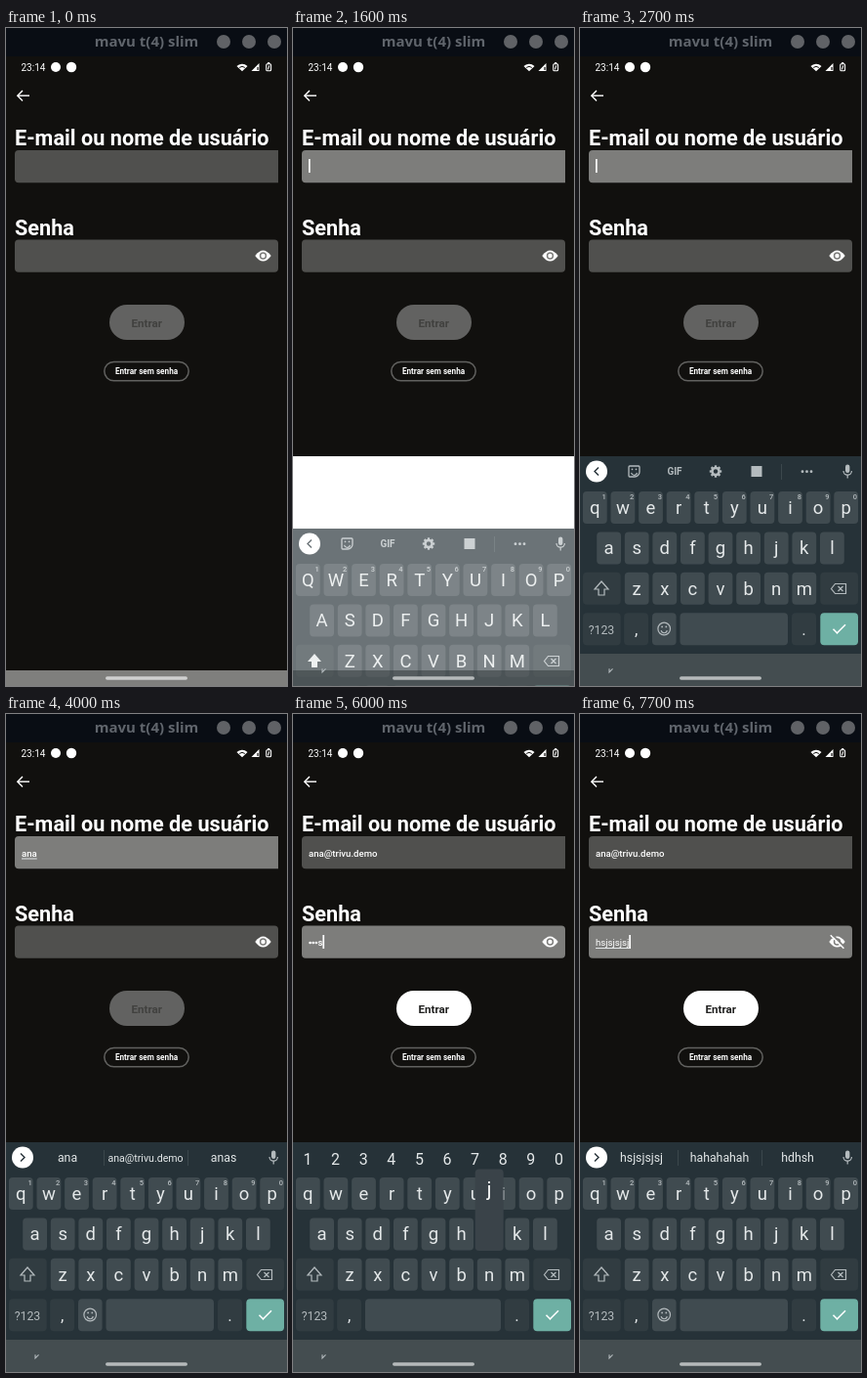
Animation, 288 px wide and 673 px high, one loop 8000 ms. Source, as an HTML page with a canvas:

```html
<!DOCTYPE html>
<html lang="pt">
<head>
<meta charset="utf-8">
<title>Login</title>
<style>
html, body { margin: 0; width: 100%; height: 100%; overflow: hidden; background: #11100e; }
canvas { display: block; width: 288px; height: 673px; }
</style>
</head>
<body>
<canvas id="stage"></canvas>
<script>
const W = 288, H = 673, LOOP = 8000, STEP = 100, BLINK = 500;
const EMAIL = 'ana@trivu.demo', PASS = 'hsjsjsjsj';
const PITCH = 28.6, ROW_H = 33, ROW_GAP = 41.4, KB_TOP = 438, KEY_TOP = 474;
const LETTERS = ['qwertyuiop', 'asdfghjkl', 'zxcvbnm'];
const C = {
  page: '#11100e', idle: '#50504e', focus: '#7d7d7b', rim: '#61615f',
  board: '#263238', key: '#404b50', fn: '#313c41', popup: '#3a4349', rule: '#3b474c',
  icon: '#b4bbbe', ink: '#e4e8e9', white: '#fff'
};

// Key moments in ms
const OPEN = 1400, LOWER = 2200, ACCEPT = 4200, NEXT = 5100, REVEAL = 7300;

const canvas = document.getElementById('stage');
const dpr = window.devicePixelRatio || 1;
canvas.width = W * dpr;
canvas.height = H * dpr;
const g = canvas.getContext('2d');

function rect(x, y, w, h, color) {
  g.fillStyle = color;
  g.fillRect(x, y, w, h);
}
function fill(color) {
  g.fillStyle = color;
  g.fill();
}
function stroke(color, width = 1.2) {
  g.strokeStyle = color;
  g.lineWidth = width;
  g.stroke();
}
function roundPath(x, y, w, h, r) {
  g.beginPath();
  g.roundRect(x, y, w, h, r);
}
function box(x, y, w, h, r, color) {
  roundPath(x, y, w, h, r);
  fill(color);
}
function frame(x, y, w, h, r, color, width) {
  roundPath(x, y, w, h, r);
  stroke(color, width);
}
function arc(x, y, r, from, to, color, width) {
  g.beginPath();
  g.arc(x, y, r, from, to);
  stroke(color, width);
}
function dot(x, y, r, color) {
  g.beginPath();
  g.arc(x, y, r, 0, 7);
  fill(color);
}
function line(x1, y1, x2, y2, color, width) {
  g.beginPath();
  g.moveTo(x1, y1);
  g.lineTo(x2, y2);
  stroke(color, width);
}
// An open "v" with its tip at (x, y), arms reaching back along dx or dy.
function chevron(x, y, dx, dy, color, width) {
  g.beginPath();
  g.moveTo(x + dx, y + (dy || dx));
  g.lineTo(x, y);
  g.lineTo(x + (dx || -dy), y + (dy || -dx));
  stroke(color, width);
}
function text(s, x, y, size, color, weight = 400, align = 'left', family = 'Roboto') {
  g.font = `${weight} ${size}px ${family}, sans-serif`;
  g.textAlign = align;
  g.fillStyle = color;
  g.fillText(s, x, y);
  return g.measureText(s).width;
}
const label = (s, x, y, size, color = C.ink, weight = 400) => text(s, x, y, size, color, weight, 'center');

// A burst presses its keys one after another; a letter lands on release.
const mailBursts = [
  { keys: 'a', from: 2800, gap: 100, hold: 100 },
  { keys: 'na', from: 3300, gap: 100, hold: 100 }
];
const passBursts = [{ keys: PASS, from: 5500, gap: 105, hold: 130 }];

function typing(bursts, t, focus) {
  const out = { text: '', popup: '', last: focus };
  for (const { keys, from, gap, hold } of bursts) {
    [...keys].forEach((k, i) => {
      const down = from + i * gap, up = down + hold;
      if (t >= up) {
        out.text += k;
        out.last = up;
      } else if (t >= down) out.popup = k;
    });
  }
  return out;
}

function stateAt(t) {
  const mail = typing(mailBursts, t, OPEN), pass = typing(passBursts, t, NEXT);
  const accepted = t >= ACCEPT, secret = t >= NEXT, shown = t >= REVEAL;
  if (accepted) [mail.text, mail.last] = [EMAIL, ACCEPT];
  if (shown) pass.last = REVEAL;
  const settle = REVEAL + 2 * STEP;
  const last = secret ? pass.last : mail.last;
  const k = Math.min(1, Math.max(0, (t - OPEN - 25) / 400));
  const busy = t < settle && secret || !mail.text;
  return {
    mail, pass, accepted, secret, shown,
    composing: t >= settle,
    tapEye: !shown && t >= REVEAL - STEP,
    tapWord: accepted && t < ACCEPT + STEP,
    caret: t >= OPEN && Math.floor((t - last) / BLINK) % 2 === 0,
    mailFocus: t >= OPEN && t < NEXT + STEP,
    passFocus: t >= NEXT + STEP,
    keyboard: t > OPEN,
    away: (1 - k) ** 2,
    upper: t < LOWER,
    strip: secret && t < settle - STEP ? 'digits' : busy ? 'tools' : 'words',
    popup: mail.popup || pass.popup
  };
}

function suggestions(s) {
  if (s.secret) return [PASS, 'hahahahah', 'hdhsh'];
  if (s.accepted) return ['e', 'de', 'que'];
  return [s.mail.text, EMAIL, s.mail.text + 's'];
}

function drawTop() {
  rect(0, 0, W, H, C.page);
  rect(0, 0, W, 29, '#090d14');
  text('mavu t(4) slim', 144, 19, 15, '#60656c', 600, 'center', '"Noto Sans"');
  for (let i = 0; i < 3; i++) dot(223 + i * 26, 14, 7, '#606266');

  text('23:14', 15.5, 44, 10, C.white);
  dot(51, 40, 5, C.white);
  dot(67, 40, 5.2, C.white);
  g.beginPath();
  g.moveTo(242, 44.3);
  g.arc(242, 44.3, 7.6, -Math.PI * .76, -Math.PI * .24);
  fill(C.white);
  arc(242, 44.3, 4.8, -Math.PI * .7, -Math.PI * .3, C.page, 1);
  g.beginPath();
  g.moveTo(251.5, 44);
  g.lineTo(259.5, 44);
  g.lineTo(259.5, 36);
  fill(C.white);
  rect(257.4, 40, 1.2, 3, C.page);
  frame(266.8, 36.8, 4.8, 7, 1, C.white, 1.1);
  rect(268.2, 35, 2, 2, C.white);
  line(269.8, 38.4, 268.6, 42.4, C.white, 1.1);

  line(24, 69.2, 12, 69.2, C.white, 1.4);
  chevron(11.8, 69.2, 5.2, 0, C.white, 1.4);
}

function drawEye(off, dim) {
  g.save();
  g.globalAlpha = dim ? .4 : 1;
  g.beginPath();
  g.moveTo(255.3, 233);
  g.quadraticCurveTo(263.5, 222, 271.7, 233);
  g.quadraticCurveTo(263.5, 244, 255.3, 233);
  fill(C.white);
  dot(263.5, 233, 3.7, C.focus);
  dot(263.5, 233, 2.2, C.white);
  if (off) {
    line(258, 225.2, 272, 239.2, C.focus, 1.7);
    line(256.8, 226.3, 270.4, 239.8, C.white, 1.5);
  }
  g.restore();
}

function drawField(title, y, radii, focused) {
  text(title, 9, y - 5, 21.7, C.white, 700);
  box(9, y, 270, 33.2, radii, focused ? C.focus : C.idle);
}

function drawCaret(x, y) {
  rect(x, y, 1.7, 14, C.white);
}

function drawPassword(s) {
  const { text: value } = s.pass;
  if (s.shown) {
    const w = text(PASS, 16, 237, 9.6, C.white);
    if (s.composing) rect(16, 239, w, 1, C.ink);
    return 16 + w;
  }
  const dotGap = 3.15;
  const hidden = value === PASS ? value.length : Math.max(0, value.length - 1);
  for (let i = 0; i < hidden; i++) dot(17.6 + i * dotGap, 234, 1.35, C.white);
  const x = 16 + hidden * dotGap;
  return x + text(value.slice(hidden), x, 237, 9.6, C.white, 500);
}

function drawForm(s) {
  drawField('E-mail ou nome de usuário', 125, [4, 0, 0, 4], s.mailFocus);
  const mailW = text(s.mail.text, 16, 145.5, 9.6, C.white, 500);
  if (!s.accepted) rect(16, 147.5, mailW, 1, C.ink);

  drawField('Senha', 216.5, 4, s.passFocus);
  const passEnd = drawPassword(s);
  drawEye(s.shown, s.tapEye);
  if (s.caret) s.secret ? drawCaret(passEnd, 226) : drawCaret(16 + mailW, 134);

  const ready = s.pass.text;
  box(106, 283, 77, 36, 18, ready ? C.white : '#626261');
  label('Entrar', 144.3, 305.5, 11.6, ready ? '#222221' : '#41413f', 700);
  frame(100.8, 341.4, 86.4, 19.4, 9.7, C.rim, 1.5);
  label('Entrar sem senha', 144, 354, 8.2, C.white, 700);
}

function face(x, y, r) {
  arc(x, y + r / 6, r / 2, .2, Math.PI - .2, C.icon);
  for (const d of [-1, 1]) dot(x + d * r / 3, y - r / 3, r / 7, C.icon);
}

function drawMic() {
  box(272, 446.5, 4.4, 8.5, 2.2, C.icon);
  arc(274.2, 453, 4.2, 0, Math.PI, C.icon);
  line(274.2, 457, 274.2, 460.5, C.icon);
}

function drawTools() {
  frame(50, 448, 11, 11, [1, 1, 5, 1], C.icon, 1.3);
  face(55.5, 453.3, 6);
  label('GIF', 97, 457.2, 10, C.icon, 700);
  for (let i = 0; i < 8; i++) {
    const a = i * Math.PI / 4;
    line(139, 453.5, 139 + Math.cos(a) * 6.2, 453.5 + Math.sin(a) * 6.2, C.icon, 2.3);
  }
  dot(139, 453.5, 4.8, C.icon);
  dot(139, 453.5, 2.2, C.board);
  rect(175.5, 448, 11, 11, C.icon);
  rect(206, 446, 1, 16, C.rule);
  for (let i = -1; i < 2; i++) dot(232.5 + i * 4.5, 453.7, 1.4, C.icon);
}

function drawWords(s) {
  if (s.tapWord) box(102, 440, 83, 28, 4, C.key);
  suggestions(s).forEach((w, i) => {
    label(w, 63 + i * 80, 458, w.length > 10 ? 10.6 : 12.3);
    if (i) rect(14 + i * 86, 446, 1, 16, C.rule);
  });
}

function drawStrip(s) {
  if (s.strip === 'digits') {
    for (let i = 0; i < 10; i++) label((i + 1) % 10, 15 + i * PITCH, 460.5, 16);
    return;
  }
  const tools = s.strip === 'tools', dir = tools ? 1 : -1;
  dot(17, 453.5, 11, C.white);
  chevron(17 - 2 * dir, 453.5, 4 * dir, 0, C.board, 1.4);
  tools ? drawTools() : drawWords(s);
  drawMic();
}

const rowY = r => KEY_TOP + r * ROW_GAP;
const rowX = r => W / 2 - (LETTERS[r].length - 1) / 2 * PITCH;

function key(x, r, w, color) {
  box(x, rowY(r), w, ROW_H, 4, color);
}

function drawShift(x, y, solid) {
  g.beginPath();
  g.moveTo(x, y - 8);
  g.lineTo(x + 7, y);
  g.lineTo(x + 3, y);
  g.lineTo(x + 3, y + 6);
  g.lineTo(x - 3, y + 6);
  g.lineTo(x - 3, y);
  g.lineTo(x - 7, y);
  g.closePath();
  solid ? fill(C.ink) : stroke(C.icon);
}

function drawBackspace(x, y) {
  g.beginPath();
  g.moveTo(x - 8, y);
  g.lineTo(x - 4, y - 5);
  g.lineTo(x + 7, y - 5);
  g.lineTo(x + 7, y + 5);
  g.lineTo(x - 4, y + 5);
  g.closePath();
  stroke(C.icon);
  for (const d of [-2.5, 2.5]) line(x - 1, y - d, x + 4, y + d, C.icon);
}

function drawKeys(s) {
  const digits = s.strip === 'digits';
  LETTERS.forEach((row, r) => [...row].forEach((k, i) => {
    const x = rowX(r) + i * PITCH, y = rowY(r);
    key(x - 12.4, r, 24.8, C.key);
    label(s.upper ? k.toUpperCase() : k, x, y + 23, 18.5);
    if (!r && !digits) label((i + 1) % 10, x + 9.3, y + 7.5, 7.5, C.icon, 500);
  }));

  const side = 38.7, right = W - 3 - side;
  for (const r of [2, 3]) key(3, r, side, C.fn);
  drawShift(22, 574, s.upper);
  key(right, 2, side, C.fn);
  drawBackspace(265.5, 573.5);

  label('?123', 22, 619.5, 12.3, C.icon);
  key(45.2, 3, 24.8, C.fn);
  label(',', 57.6, 621, 17);
  const space = digits ? 74 : 102.5;
  key(space, 3, 213 - space, C.key);
  if (!digits) {
    key(74, 3, 24.6, C.key);
    arc(86.2, 614.5, 6.3, 0, 7, C.icon);
    face(86.2, 614.5, 6.3);
  }
  key(217, 3, 25, C.fn);
  label('.', 229.5, 621, 17);
  key(right, 3, side, '#6eb0a4');
  line(259.5, 614.7, 264, 619.2, C.white, 1.6);
  line(263, 619.2, 272, 610.2, C.white, 1.6);
}

function drawPopup(k) {
  const r = LETTERS.findIndex(row => row.includes(k));
  const x = rowX(r) + LETTERS[r].indexOf(k) * PITCH, y = rowY(r);
  box(x - 14.5, y - 50, 29, ROW_H + 50.5, 4, C.popup);
  label(k, x, y - 22, 19.5, C.white);
}

function drawKeyboard(s) {
  const tall = H - KB_TOP;
  rect(0, KB_TOP, W, tall, C.white);
  g.save();
  g.translate(0, Math.round(s.away * tall));
  rect(0, KB_TOP, W, tall, C.board);
  drawStrip(s);
  drawKeys(s);
  if (s.popup) drawPopup(s.popup);
  rect(0, 640, W, 33, '#444d50');
  rect(0, KB_TOP, W, tall, `rgba(255,255,255,${s.away})`);
  g.restore();
  if (s.away) rect(0, 657, W, 16, 'rgba(45,52,54,.5)');
  chevron(30, 658.8, 0, -3.5, C.icon, 1.1);
}

function draw(t) {
  const s = stateAt(t);
  g.setTransform(dpr, 0, 0, dpr, 0, 0);
  drawTop();
  drawForm(s);
  if (s.keyboard) drawKeyboard(s);
  else rect(0, 657, W, 16, '#7f7f7d');
  box(102, 663.2, 84, 3.6, 1.8, s.keyboard ? '#b6babb' : '#cfd0d0');
}

const start = performance.now();
function tick() {
  const t = (performance.now() - start) % LOOP;
  draw(Math.floor(t / STEP) * STEP);
  requestAnimationFrame(tick);
}
tick();
</script>
</body>
</html>
```
